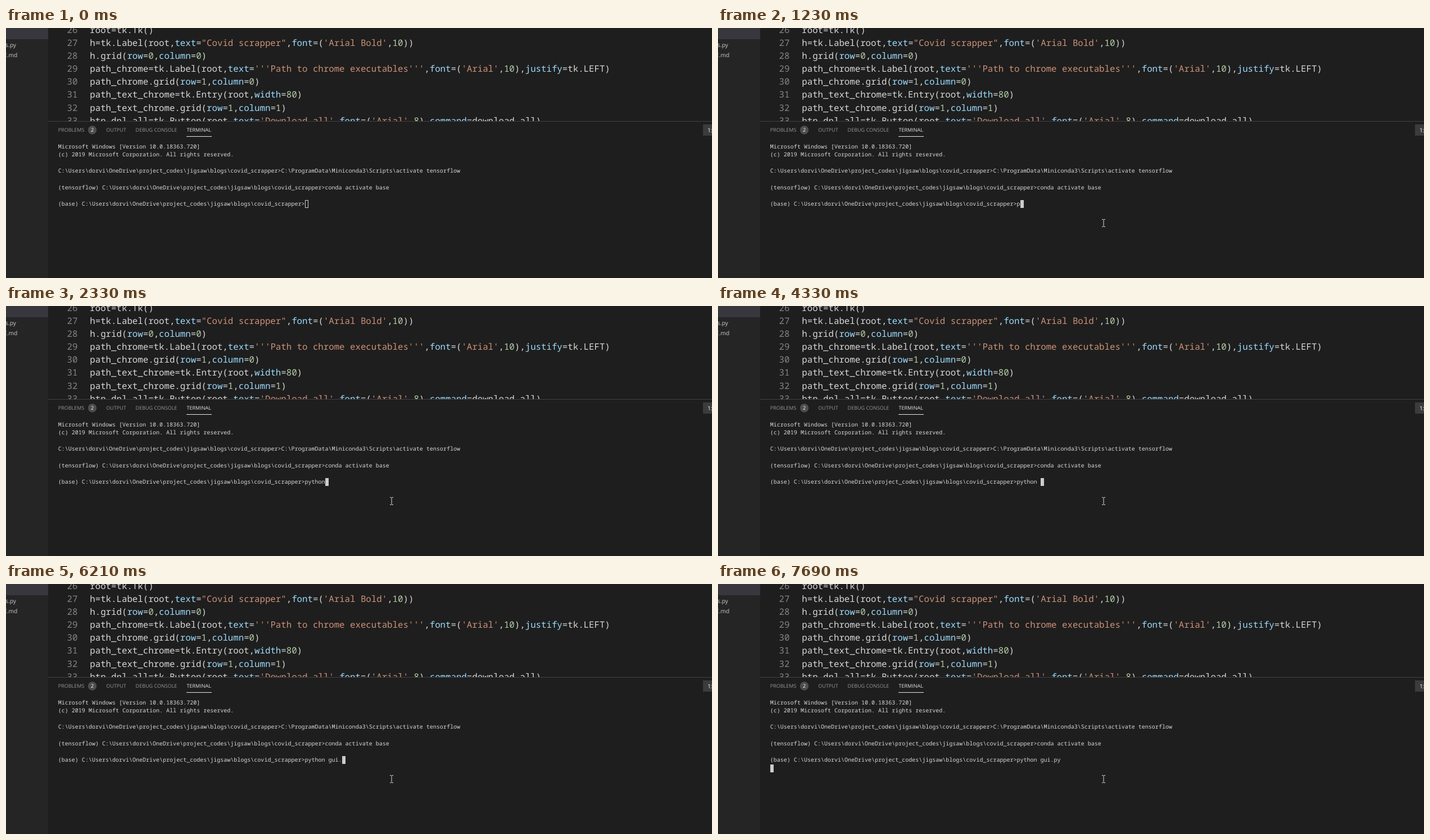
Recreate the animation shown at these times as an HTML page with a canvas. Size 1256x446 px, loop 8 s.

```html
<!DOCTYPE html>
<html lang="en">
<head>
<meta charset="utf-8">
<title>Running a script in the terminal</title>
<style>
  html, body { margin: 0; width: 100%; height: 100%; overflow: hidden; background: #1e1e1e; }
  canvas { display: block; width: 1256px; height: 446px; }
</style>
</head>
<body>
<canvas id="stage" width="1256" height="446"></canvas>
<script>
const ctx = document.getElementById('stage').getContext('2d');
ctx.textRendering = 'geometricPrecision';

const LOOP = 8000;
const MONO = '"Noto Sans Mono", monospace';
const SANS = '"Open Sans", sans-serif';

const code = [
  `root=tk.Tk()`,
  `h=tk.Label(root,text="Covid scrapper",font=('Arial Bold',10))`,
  `h.grid(row=0,column=0)`,
  `path_chrome=tk.Label(root,text='''Path to chrome executables''',font=('Arial',10),justify=tk.LEFT)`,
  `path_chrome.grid(row=1,column=0)`,
  `path_text_chrome=tk.Entry(root,width=80)`,
  `path_text_chrome.grid(row=1,column=1)`,
  `btn_dnl_all=tk.Button(root,text='Download all',font=('Arial',8),command=download_all)`
];
const FIRST_LINE = 26;
const TOKEN = /('''.*?'''|'[^']*'|"[^"]*")|((?<=[(,])\w+(?==))|(\b\d+\b)/g;

const path = String.raw`C:\Users\dorvi\OneDrive\project_codes\jigsaw\blogs\covid_scrapper>`;
const prompt = '(base) ' + path;
const output = [
  'Microsoft Windows [Version 10.0.18363.720]',
  '(c) 2019 Microsoft Corporation. All rights reserved.',
  '',
  path + String.raw`C:\ProgramData\Miniconda3\Scripts\activate tensorflow`,
  '',
  '(tensorflow) ' + path + 'conda activate base',
  ''
];

const command = 'python gui.py';
const keyTimes = [1230, 1550, 1780, 2010, 2160, 2330, 4330, 5510, 5740, 5890, 6210, 6990, 7310];
const ENTER = 7690;

const moveTimes = [70, 140, 220, 300, 370];
const CLICK = 370, RELEASE = 530;
const from = [766, 412], to = [686, 348];

const CELL = 6.018, ROW = 14.63, TERM_X = 92.8;

function rect(x, y, w, h, color) {
  ctx.fillStyle = color;
  ctx.fillRect(x, y, w, h);
}

function disc(x, y, r, color) {
  ctx.fillStyle = color;
  ctx.beginPath();
  ctx.arc(x, y, r, 0, Math.PI * 2);
  ctx.fill();
}

function text(str, x, y, font, color, align = 'left') {
  ctx.font = font;
  ctx.fillStyle = color;
  ctx.textAlign = align;
  ctx.fillText(str, x, y);
}

function codeLine(line, x, y, font) {
  const advance = 9.444;
  const put = (str, col, color) => text(str, x + col * advance, y, font, color);
  let col = 0;
  for (const m of line.matchAll(TOKEN)) {
    put(line.slice(col, m.index), col, '#d8d8d8');
    put(m[0], m.index, m[1] ? '#ce9178' : m[2] ? '#9cdcfe' : '#b5cea8');
    col = m.index + m[0].length;
  }
  put(line.slice(col), col, '#d8d8d8');
}

function drawEditor() {
  const font = '500 15.74px ' + MONO;
  ctx.save();
  ctx.beginPath();
  ctx.rect(75, 0, 1181, 166);
  ctx.clip();
  code.forEach((line, i) => {
    const y = 8.6 + i * 23.15;
    text(FIRST_LINE + i, 127.4, y, font, '#858585', 'right');
    codeLine(line, 149.3, y, font);
  });
  ctx.restore();
}

function drawSidebar() {
  rect(0, 0, 75, 446, '#252526');
  rect(0, 0, 75, 20, '#37373d');
  text('s.py', 18, 34, '10.3px ' + SANS, '#cccccc', 'right');
  text('E.md', 20.3, 52, '10.3px ' + SANS, '#cccccc', 'right');
}

function drawTabs() {
  const font = '9px ' + SANS;
  rect(75, 166, 1181, 1, '#424242');
  text('PROBLEMS', 92.8, 185.2, font, '#979797');
  text('OUTPUT', 178.3, 185.2, font, '#979797');
  text('DEBUG CONSOLE', 230.6, 185.2, font, '#979797');
  text('TERMINAL', 321.5, 185.2, font, '#e7e7e7');
  rect(321, 193, 45, 1, '#e7e7e7');
  disc(153.5, 182, 7.7, '#4d4d4d');
  text('2', 153.5, 185.2, font, '#ffffff', 'center');
  rect(1240, 172, 16, 20, '#3c3c3c');
  text('1:', 1248, 186, '10.3px ' + SANS, '#f0f0f0');
}

function drawTerminal(t) {
  const font = '500 10.03px ' + MONO;
  const typed = command.slice(0, keyTimes.filter(k => k <= t).length);
  [...output, prompt + typed].forEach((line, i) =>
    text(line, TERM_X, 214.6 + i * ROW, font, '#d8d8d8'));

  const entered = t >= ENTER;
  const x = entered ? 93 : Math.round(TERM_X + prompt.length * CELL) + typed.length * 6;
  const y = entered ? 322 : 307;
  if (t >= CLICK) {
    rect(x, y, 6, 14, '#cccccc');
  } else {
    ctx.strokeStyle = '#cccccc';
    ctx.lineWidth = 1;
    ctx.strokeRect(x + 0.5, y + 0.5, 5, 13);
  }
}

function drawPointer(t) {
  const step = moveTimes.filter(m => m <= t).length - 1;
  if (step < 0) return;
  const rest = (1 - step / (moveTimes.length - 1)) ** 2;
  const [x, y] = to.map((v, i) => Math.round(v + (from[i] - v) * rest));
  if (t >= CLICK && t < RELEASE) disc(x - 2, y - 1, 10.2, '#8e8b0e');
  const color = '#dcdcdc';
  rect(x - 0.5, y - 6, 1, 12, color);
  for (const dy of [-7, 6]) {
    rect(x - 3, y + dy, 2.5, 1, color);
    rect(x + 0.5, y + dy, 2.5, 1, color);
  }
}

function draw(t) {
  rect(0, 0, 1256, 446, '#1e1e1e');
  drawSidebar();
  drawEditor();
  drawTabs();
  drawTerminal(t);
  drawPointer(t);
}

const start = performance.now();
function frame() {
  draw((performance.now() - start) % LOOP);
  requestAnimationFrame(frame);
}
frame();
</script>
</body>
</html>
```
